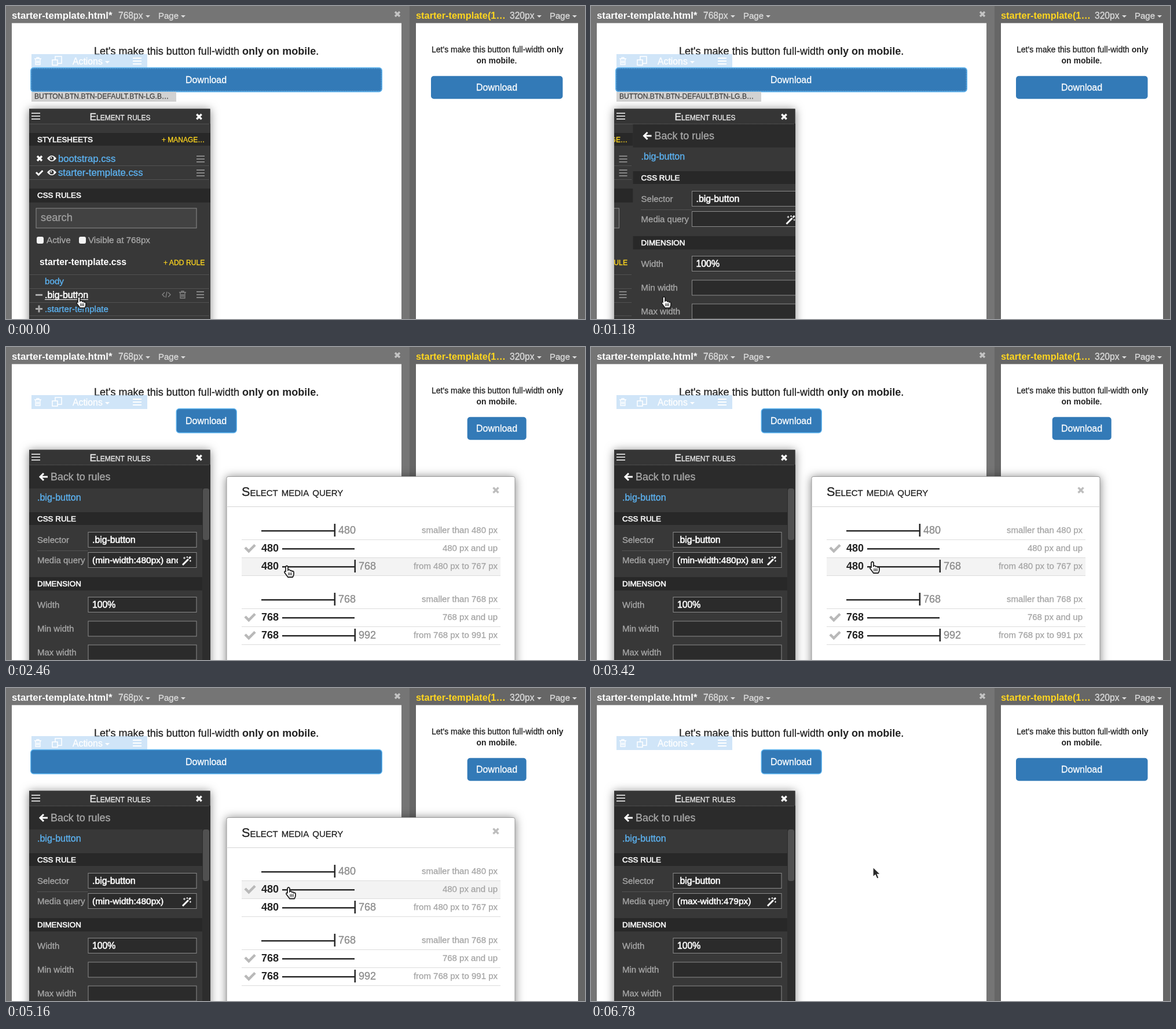
An HTML page for the animation above (6840 ms loop, 1000x540 px).

```html
<!DOCTYPE html>
<html lang="en">
<head>
<meta charset="utf-8">
<title>Element rules</title>
<style>
html, body { margin: 0; width: 100%; height: 100%; overflow: hidden; background: #757575; }
svg { display: block; }
text { font-family: "Liberation Sans", Arial, sans-serif; white-space: pre; stroke-width: .3; }
.b { font-weight: bold; stroke: none; }
.strong { stroke-width: .6; }
.sc { font-variant: small-caps; }
.end { text-anchor: end; }
.mid { text-anchor: middle; }
.shade { filter: drop-shadow(0 1px 8px rgba(0,0,0,.5)); }
</style>
</head>
<body>
<svg id="stage" width="1000" height="540" viewBox="0 0 1000 540"></svg>
<script>
const BLUE = '#337ab7', LINK = '#5db5f5', GOLD = '#ffd61f', BAR = '#282828',
      BODY = '#383838', GREY = '#a9a9a9', DIM = '#858585';

// Drawing helpers: each returns SVG markup
const text = (x, y, size, fill, str, cls = '') =>
  `<text x="${x}" y="${y}" font-size="${size}" fill="${fill}" stroke="${fill}" class="${cls}">${str}</text>`;
const rect = (x, y, w, h, fill, more = '') =>
  `<rect x="${x}" y="${y}" width="${w}" height="${h}" fill="${fill}" ${more}/>`;
const line = (d, color, w = 1, more = '') =>
  `<path d="${d}" fill="none" stroke="${color}" stroke-width="${w}" ${more}/>`;
const shape = (d, fill, more = '') => `<path d="${d}" fill="${fill}" ${more}/>`;
const group = (id, body) => `<g id="${id}">${body}</g>`;

const cross = (x, y, r, c, w = 3.4) =>
  line(`M${x - r} ${y - r}l${2 * r} ${2 * r}m0 ${-2 * r}l${-2 * r} ${2 * r}`, c, w);
const bars = (x, y, w, c) => line(`M${x} ${y - 5}h${w}m${-w} 5h${w}m${-w} 5h${w}`, c, 2);
const caret = (x, y, c) => shape(`M${x - 4} ${y - 2}h8l-4 4z`, c);
const check = (x, y, c, r = 6) =>
  line(`M${x - r} ${y}l${r * .7} ${r * .7} ${r * 1.2} ${-r * 1.2}`, c, r / 2);
const trash = (x, y, c) => line(
  `M${x - 6} ${y - 4}h12m-8 0v-2h4v2m-6 0v10h8v-10m-6 3v5m2-5v5m2-5v5`, c, 1.3);
const eye = (x, y) =>
  shape(`M${x - 8} ${y}q8-10 16 0q-8 10-16 0z`, '#fff') +
  `<circle cx="${x}" cy="${y}" r="3.6" fill="${BODY}"/><circle cx="${x - 1}" cy="${y - 1}" r="1.2" fill="#fff"/>`;
const dots = (y, x1 = 41, x2 = 351) =>
  line(`M${x1} ${y + .5}H${x2}`, '#6c6c6c', 1, 'stroke-dasharray="1 1"');
const section = (y, h, title) =>
  rect(40, y, 313, h, BAR) + text(54, y + 16, 13.4, '#fff', title, 'strong');
const field = y => rect(142, y, 187, 26, '#2b2b2b', 'stroke="#8c8c8c"');

function pages() {
  const header = (x, c, w, size, name, px, page) =>
    text(x, 22, size, c, name, 'b') +
    text(px, 22, 15.6, '#ddd', w) + caret(px + 51, 18, '#ddd') +
    text(page, 22, 15, '#ddd', 'Page') + caret(page + 43, 18, '#ddd');
  return rect(0, 0, 1000, 540, '#757575') + rect(697, 0, 303, 540, '#666') +
    rect(10, 29.5, 673, 530, '#fff') + rect(708, 29.5, 280, 530, '#fff') +
    header(10, '#fff', '768px', 16.8, 'starter-template.html*', 194, 263) +
    header(708, GOLD, '320px', 16.4, 'starter-template(1…', 870, 939) +
    cross(676, 14, 4, '#c4c4c4') +
    text(152, 84, 18.05, '#222', `Let's make this button full-width <tspan class="b">only on mobile</tspan>.`) +
    text(735, 80, 14, '#222', `Let's make this button full-width <tspan class="b">only</tspan>`) +
    text(847.5, 99, 14, '#222', `<tspan class="b">on mobile</tspan>.`, 'mid') +
    rect(0, 120.7, 0, 39.6, BLUE, 'id="small" rx="5"') +
    text(812, 146, 16, '#fff', 'Download') +
    rect(44, 83, 200, 24, 'rgba(190,219,245,.72)') +
    trash(55, 95, '#fff') +
    line('M80 93h9v9h-9zM85 93v-6h11v12h-7', '#fff', 1.5) +
    text(115, 101, 15.8, '#fff', 'Actions') + caret(175, 97, '#fff') + bars(219, 95, 15, '#fff') +
    rect(0, 106.5, 0, 41.5, BLUE, 'id="big" rx="5" stroke="#5cb4f0" stroke-width="1.3"') +
    rect(0, 108, 0, 38.5, 'none', 'id="ring" rx="4" stroke="#d8eeff" stroke-opacity=".6" stroke-dasharray="1 2"') +
    text(310, 133, 16, '#fff', 'Download') +
    group('label', rect(44, 148, 250, 17, '#d2d2d2') +
      text(49, 160, 12.1, '#444', 'BUTTON.BTN.BTN-DEFAULT.BTN-LG.B…'));
}

function list() {
  const sheet = (y, name) => eye(79, y) + text(90, y + 6, 16.7, LINK, name) +
    bars(329, y + 1, 14, DIM) + dots(y + 12);
  const box = x => rect(x, 398, 12, 12, '#f4f4f4', 'rx="3"');
  return rect(40, 203, 313, 337, BODY) +
    section(219, 22, 'STYLESHEETS') + text(269, 235, 12, GOLD, '+ MANAGE…') +
    cross(58, 263, 4, '#fff') + check(58, 287, '#fff') +
    sheet(263, 'bootstrap.css') + sheet(287, 'starter-template.css') +
    section(315, 24, 'CSS RULES') +
    rect(52, 349, 277, 34, '#424242', 'stroke="#8c8c8c"') + text(60, 371, 18.3, '#a0a0a0', 'search') +
    box(53) + text(70, 409, 15.3, GREY, 'Active') +
    box(126) + text(142, 409, 15.2, GREY, 'Visible at 768px') +
    text(58, 447, 15.8, '#fff', 'starter-template.css', 'b') +
    text(272, 447, 12.2, GOLD, '+ ADD RULE') +
    [463, 487, 511, 534].map(y => dots(y)).join('') +
    text(67, 480, 15.2, LINK, 'body') +
    text(67, 504, 15.9, '#fff', '.big-button', 'strong') + line('M67 506.5h75', '#fff') +
    text(67, 528, 15.1, LINK, '.starter-template') +
    line('M51 498.5h12', '#aaa', 3) + line('M51 522.5h12m-6-6v12', '#aaa', 3) +
    line('M274 494l-4 4 4 4m6-8l4 4-4 4m-2-9l-2 10', DIM, 1.3) +
    trash(305, 498, DIM) + bars(329, 498, 13, DIM);
}

function rule() {
  const row = (y, name, value = '') => text(54, y + 18, 15, GREY, name) + field(y) +
    text(149, y + 18, 15.8, '#fff', value, 'strong');
  return rect(40, 203, 313, 337, BODY) + rect(40, 203, 313, 41, '#2b2b2b') +
    line('M72 224H59m6-6l-6 6 6 6', '#fff', 3) + text(77, 230, 17.9, GREY, 'Back to rules') +
    text(54, 265, 16, LINK, '.big-button') +
    section(285, 22, 'CSS RULE') + row(319.5, 'Selector', '.big-button') +
    dots(351, 54, 142) + row(354.5, 'Media query') +
    `<svg x="142" y="354" width="155" height="27">${text(7, 18.5, 15.5, '#fff', '', 'query strong')}</svg>` +
    line('M305 376l10-10', '#fff', 3) + line('M316 365l3-3', '#fff', 3) +
    line('M308 362v4m-2-2h4m3-3v3m-1.5-1.5h3m4 5v3m-1.5-1.5h3', '#fff') +
    section(397, 23, 'DIMENSION') + row(431.5, 'Width', '100%') +
    row(473, 'Min width') + row(514, 'Max width') +
    rect(339, 244, 14, 296, '#2d2d2d') + rect(340, 244, 11, 89, '#505050', 'rx="4"');
}

function modal() {
  const row = (y, from, to, note, tick) => {
    const x1 = from ? 477 : 441, x2 = from ? 602 : 567;
    return line(`M407 ${y + 16.5}H854`, '#dcdcdc') +
      (tick ? check(422, y - 1, '#b9b9b9', 9) : '') +
      (from ? text(441, y + 6, 18, '#222', from, 'b') : '') +
      line(`M${x1} ${y + 1.3}H${x2}`, '#2a2a2a', 2.6) +
      (to ? line(`M${x2 + .8} ${y - 11}v22`, '#2a2a2a', 2.6) + text(x2 + 7, y + 6, 18, '#8a8a8a', to) : '') +
      text(849, y + 5, 15, '#a4a4a4', note, 'end');
  };
  const trio = (y, a, b, tick) =>
    row(y, '', a, `smaller than ${a} px`) +
    row(y + 31, a, '', `${a} px and up`, true) +
    row(y + 62, a, b, `from ${a} px to ${b - 1} px`, tick);
  return rect(381, 223.5, 498, 340, '#fff', 'rx="3" stroke="#999" class="shade"') +
    text(407, 257, 21.6, '#222', 'Select media query', 'sc') +
    cross(846, 247, 4.5, '#bdbdbd') + line('M381 275.5H879', '#d5d5d5') +
    rect(407, 0, 447, 31, '#f3f3f3', 'id="hover"') +
    trio(316, 480, 768, false) + trio(435, 768, 992, true);
}

const cursors =
  group('hand', shape('M-2 1Q0-2 2 1V7Q5 5 6 8Q9 7 9 9Q12 8 12 11V14Q12 16 10 19H2Q-1 15-4 11Q-4 8-2 9Z',
    '#fff', 'stroke="#222" stroke-width="1.8"') + line('M3 11v5m2.5-5v5m2.5-5v5', '#222', 1.2)) +
  group('arrow', shape('M0 0V17L4 13.5L7 20L10 18.5L7.5 12.5H13Z', '#2a2a2a', 'stroke="#fff" stroke-width="1.3"'));

stage.innerHTML = pages() +
  '<clipPath id="inner"><rect x="40" y="203" width="313" height="337"/></clipPath>' +
  rect(40, 177.5, 312.5, 380, BODY, 'class="shade"') + rect(40, 177.5, 312.5, 26, '#353535') +
  bars(44, 190, 15, '#ccc') + text(197, 197, 17.4, '#eee', 'Element rules', 'sc mid') + cross(333.5, 191, 4.2, '#fff') +
  `<g clip-path="url(#inner)">${group('list', list())}${group('rule', rule())}</g>` + dots(203) +
  group('modal', modal()) + group('cursor', cursors);

const el = id => document.getElementById(id);
const query = stage.querySelector('.query');
const show = (id, on) => el(id).setAttribute('visibility', on ? 'visible' : 'hidden');
const set = (id, attrs) => { for (const k in attrs) el(id).setAttribute(k, attrs[k]); };
const clamp = u => Math.min(1, Math.max(0, u));
const ease = u => (u = clamp(u), u * u * (3 - 2 * u));

const LOOP = 6840, WIDTH = 313;
// Pointer tip: time, x, y
const path = [[0, 126, 502], [1360, 126, 502], [1720, 308, 368], [2160, 308, 368],
  [2460, 485, 378], [2700, 485, 378], [3420, 486, 371], [3780, 486, 370], [3960, 487, 350],
  [4140, 487, 350], [4740, 488, 346], [4920, 488, 346], [5400, 488, 343], [5580, 488, 343],
  [5820, 488, 312], [6360, 488, 311], [6780, 487, 309], [LOOP, 487, 309]];
const values = ['', '(max-width:479px)', '(min-width:480px)', '(min-width:480px) and (max-width:767px)'];

function pointer(t) {
  const i = path.findIndex(p => p[0] > t), [t0, x0, y0] = path[i - 1], [t1, x1, y1] = path[i];
  const u = ease((t - t0) / (t1 - t0));
  return [x0 + (x1 - x0) * u, y0 + (y1 - y0) * u];
}

function step(t) {
  if (t < 1000) return 0;
  const base = t < 2220 ? 1000 : 2220;
  return base + Math.floor((t - base) / 60) * 60;
}

function draw(now) {
  const t = step(now % LOOP), [x, y] = pointer(t);
  const row = t < 2460 ? 0 : y > 363 ? 3 : y > 332 ? 2 : 1;

  const slide = WIDTH * ease((t - 940) / 300);
  set('list', { transform: `translate(${-slide})` });
  set('rule', { transform: `translate(${WIDTH - slide})` });

  const wide = row === 0 || row === 2, full = row < 2;
  set('big', wide ? { x: 42.7, width: 606.6 } : { x: 294.2, width: 104 });
  set('ring', wide ? { x: 44, width: 604 } : { x: 295.5, width: 101.5 });
  set('small', full ? { x: 734, width: 227.5 } : { x: 796.7, width: 102 });
  show('label', t < 1420);
  show('ring', t < 1420);
  query.textContent = values[row];

  set('modal', { opacity: clamp((t - 2160) / 240) * clamp((6720 - t) / 300) });
  set('hover', { y: 270.5 + 31 * row });
  show('hover', row);

  const hand = t < 1420 || t >= 1720 && t < 2280 || t >= 2460 && t < 6600;
  set('cursor', { transform: `translate(${x} ${y})` });
  show('hand', hand);
  show('arrow', !hand);
}

let start;
function tick(now) {
  start ??= now;
  draw(now - start);
  requestAnimationFrame(tick);
}
draw(0);
requestAnimationFrame(tick);
</script>
</body>
</html>
```
